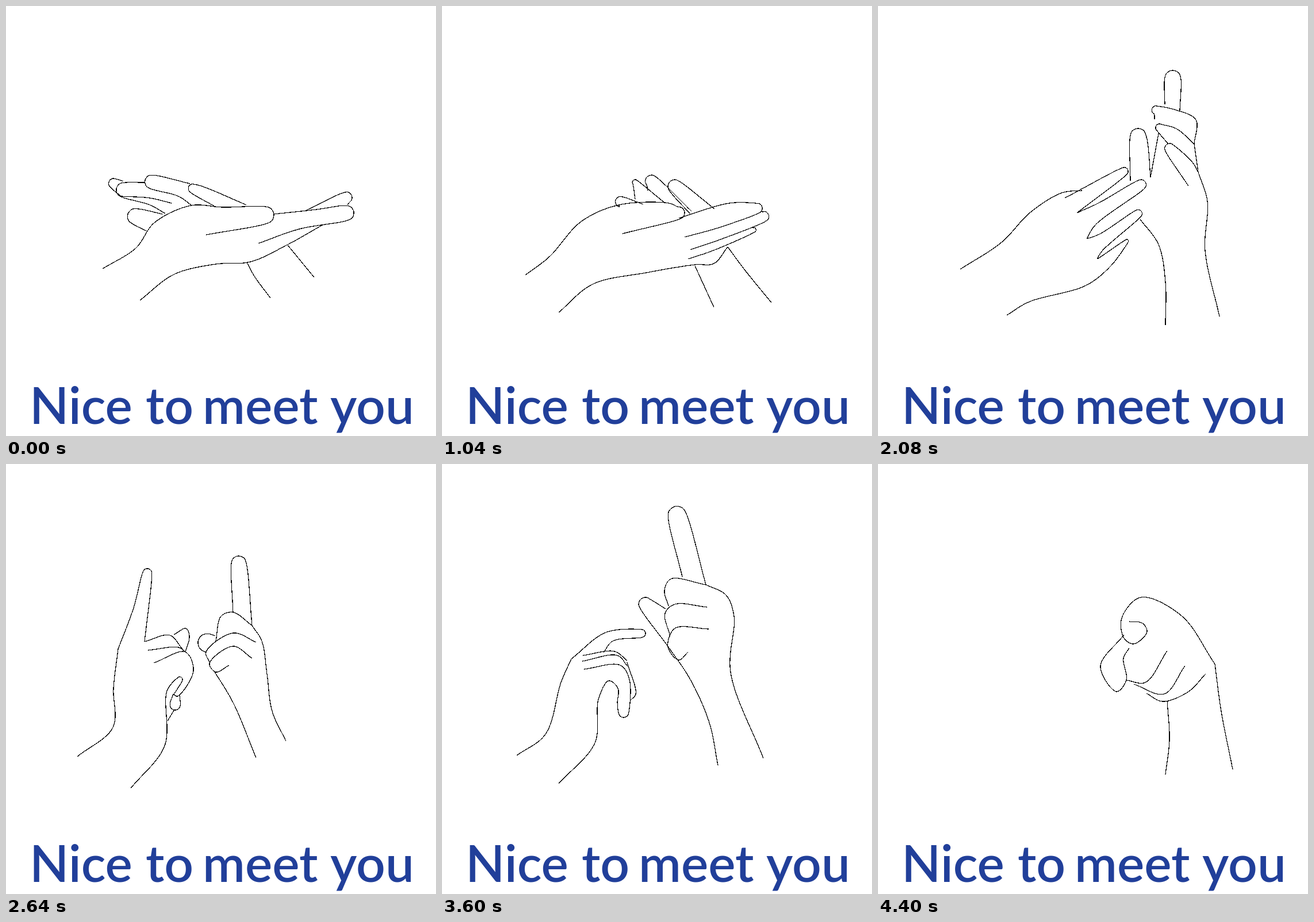
An HTML page that plays this animation: 748 px wide and 748 px high, repeating every 4.48 s.

```html
<!DOCTYPE html>
<html lang="en">
<head>
<meta charset="utf-8">
<title>Nice to meet you</title>
<style>
  html, body { margin: 0; width: 100%; height: 100%; overflow: hidden; background: #fff; }
  svg { display: block; width: 748px; height: 748px; }
  path { fill: none; stroke: #000; stroke-width: 1.25; shape-rendering: crispEdges; }
  text { font: 600 89px Lato, "Open Sans", sans-serif; fill: #213f9a; }
</style>
</head>
<body>
<svg viewBox="0 0 748 748">
  <path id="ink"/>
  <text y="727"><tspan x="41">Nice </tspan><tspan x="243">to </tspan><tspan x="342">meet </tspan><tspan x="564">you</tspan></text>
</svg>
<script>
const LOOP = 4480, STEP = 80, SAMPLES = 80, LEFT_GONE = 4160;

// Key points of each stroke, arm edges first. "x,y,r" is a round fingertip of radius r.
const poses = [
  { left: ["168,457 226,421 258,377 322,347 376,350 466,362,15 348,398",
           "233,512 292,467 365,449 425,445 490,415 552,380",
           "466,362 540,354 605,358,13 510,388 439,413",
           "523,355 601,329,10 594,346"],
    right: ["536,472 490,416",
            "460,508 432,470 419,446",
            "246,392 212,362,14 272,362",
            "277,361 250,346 192,318,13 242,307",
            "320,309 242,303,12 300,331 323,347",
            "418,346 345,315 318,314,8 362,348",
            "200,331 180,304,9 204,305",
            "200,331 250,334 288,343"] },
  { left: ["145,468 187,436 242,375 308,346 395,343 422,358,11 314,396",
           "203,533 262,484 355,464 440,450 473,448 497,419",
           "412,369 500,343 557,350,9 480,386 422,402",
           "555,356 568,363,9 490,404 432,424",
           "540,384 546,388,4 470,426 428,440"],
    right: ["573,516 525,457 497,419",
            "473,524 440,452",
            "350,345 302,338,9 308,347",
            "336,336 333,303,5 388,343",
            "358,321 357,297,11 434,357",
            "474,353 396,306,12 432,362"] },
  { left: ["176,432 235,362 300,337 387,322,13 302,375",
           "222,514 312,461 420,439 481,423,10 420,416",
           "384,340 440,327 520,337,13 430,377 374,390",
           "510,349 552,362,11 465,386 387,416",
           "526,377 470,399 389,430"],
    right: ["595,548 575,450 581,407 598,371",
            "498,555 490,490 479,426",
            "410,333 421,286,14 442,327",
            "443,327 457,228,15 475,255",
            "486,315 472,275 476,254 505,266 520,290",
            "522,326 531,244,18 555,290 561,344",
            "561,344 574,291,13 598,345 598,371"] },
  { left: ["143,458 215,411 265,359 320,325 355,321",
           "224,538 262,515 362,486 405,452 435,407,3 382,440",
           "325,334 434,284,7 346,360",
           "346,360 385,342 465,306,9 378,381 363,405",
           "363,405 385,397 458,357,7 390,426 381,440"],
    right: ["594,540 569,425 573,340 557,289",
            "500,555 500,480 488,415 456,371",
            "439,304 452,213,14 470,245 474,298",
            "499,171 513,112,14 525,182",
            "481,197 477,178,8 515,180 553,198 550,240",
            "550,240 520,214 484,208,7 505,240",
            "540,313 502,241,9 547,272 557,289",
            "474,298 488,222",
            "550,240 557,289"] },
  { left: ["124,509 186,458 187,390 195,322",
           "217,564 276,490 280,395 305,371,5 291,402",
           "195,322 222,250 247,182,8 241,309",
           "241,309 285,298 307,322",
           "247,324 300,319 312,327",
           "257,346 312,327 326,360 298,404 291,400",
           "291,400 293,428,9 302,403",
           "292,297 313,286 319,300 312,327",
           "293,427 281,447"],
    right: ["487,482 463,430 454,365 445,308 428,281",
            "435,511 395,415 362,360",
            "364,299 334,309,16 349,325",
            "395,258 404,160,13 428,281",
            "365,308 374,265 395,258 428,281",
            "435,310 395,294 348,327 354,345",
            "428,338 395,317 354,347 365,362 388,350"] },
  { left: ["130,507 180,470 207,380 225,339",
           "203,556 266,485 272,410 290,377 306,390 305,415",
           "225,339 285,293 354,294,7 297,308 281,328",
           "245,333 300,326 322,342",
           "244,343 305,333 323,352",
           "247,357 310,350 326,375 316,441,9 305,415",
           "322,345 337,400 328,411"],
    right: ["559,512 502,362 508,265 494,228 459,210",
            "480,524 465,450 432,375 393,317",
            "389,252 346,235,12 393,317",
            "418,196 405,74,16 459,210",
            "394,247 387,220 398,200 459,210",
            "461,249 405,244 388,260 397,300",
            "464,287 405,286 393,318 412,341 428,327"] },
  { right: ["617,531 597,430 586,348",
            "500,540 507,480 503,412",
            "428,297 387,352 415,396 432,376 427,338 437,320",
            "437,274 460,277 468,292 445,313 428,303 424,268 457,232 528,264 586,348",
            "503,325 465,380 432,376",
            "534,351 498,400 445,383",
            "570,365 540,396 495,413 467,399"] }
];
poses[6].left = poses[5].left;

// Each move leads to the next pose; the hands swing out by [dx, dy] on the way.
const moves = [
  { from: 0, to: 1040, left: [-33, 10], right: [10, 15] },
  { from: 1040, to: 1520, left: [-20, 0], right: [0, 0] },
  { from: 1600, to: 2080, left: [-40, 8], right: [0, 0] },
  { from: 2240, to: 2640, left: [0, 0], right: [-8, 0] },
  { from: 3200, to: 3600, left: [0, 0], right: [0, 0] },
  { from: 3600, to: 3920, left: [-10, 3], right: [0, 0] }
];

const mix = (a, b, k) => a + (b - a) * k;

// Replaces a fingertip with five points on a half circle, starting on the side of a.
function roundTip([x, y, r], a, b) {
  const mx = (a[0] + b[0]) / 2, my = (a[1] + b[1]) / 2;
  const len = Math.hypot(x - mx, y - my), ux = (x - mx) / len, uy = (y - my) / len;
  const side = (a[1] - my) * ux - (a[0] - mx) * uy > 0 ? 1 : -1;
  return [2, 1, 0, -1, -2].map(n => {
    const angle = n * side * Math.PI / 4, along = r * (Math.cos(angle) - 1), across = r * Math.sin(angle);
    return [x + ux * along - uy * across, y + uy * along + ux * across];
  });
}

// Even samples along a centripetal Catmull-Rom curve.
function sample(text) {
  const keys = text.split(" ").map(p => p.split(",").map(Number));
  const pts = keys.flatMap((p, i) => p[2] ? roundTip(p, keys[i - 1], keys[i + 1]) : [p]);
  const last = pts.length - 1, knots = [0];
  for (let i = 0; i < last; i++)
    knots.push(knots[i] + Math.sqrt(Math.hypot(pts[i + 1][0] - pts[i][0], pts[i + 1][1] - pts[i][1])));
  const slope = (i, j, k) => (pts[j][k] - pts[i][k]) / (knots[j] - knots[i]);
  const tangent = (i, k) => i === 0 ? slope(0, 1, k) : i === last ? slope(last - 1, last, k)
    : slope(i - 1, i, k) - slope(i - 1, i + 1, k) + slope(i, i + 1, k);
  let i = 0;
  return Array.from({ length: SAMPLES + 1 }, (_, n) => {
    const pos = n / SAMPLES * knots[last];
    while (i < last - 1 && pos > knots[i + 1]) i++;
    const h = knots[i + 1] - knots[i], u = (pos - knots[i]) / h, v = 1 - u;
    return [0, 1].map(k =>
      v * v * ((1 + 2 * u) * pts[i][k] + u * h * tangent(i, k)) +
      u * u * ((3 - 2 * u) * pts[i + 1][k] - v * h * tangent(i + 1, k)));
  });
}

const shapes = {};
for (const side of ["left", "right"]) shapes[side] = poses.map(pose => pose[side].map(sample));

function drawHand(side, t) {
  const n = Math.max(0, moves.findLastIndex(move => t >= move.from)), move = moves[n];
  const u = Math.min(1, (t - move.from) / (move.to - move.from)), k = u * u * (3 - 2 * u);
  const [dx, dy] = move[side].map(v => v * Math.sin(Math.PI * u));
  const from = shapes[side][n], to = shapes[side][n + 1];
  let d = "";
  for (let i = 0; i < Math.max(from.length, to.length); i++) {
    // A stroke without a partner is shown only in its own half.
    if (!(k < 0.5 ? from : to)[i]) continue;
    const p = from[i] || to[i], q = to[i] || from[i];
    d += "M" + p.map(([x, y], j) =>
      (mix(x, q[j][0], k) + dx).toFixed(1) + " " + (mix(y, q[j][1], k) + dy).toFixed(1)).join("L");
  }
  return d;
}

const ink = document.getElementById("ink");
const start = performance.now();
let shown = -1;

function tick(now) {
  const t = Math.floor(Math.max(0, now - start) % LOOP / STEP) * STEP;
  if (t !== shown) {
    shown = t;
    ink.setAttribute("d", (t < LEFT_GONE ? drawHand("left", t) : "") + drawHand("right", t));
  }
  requestAnimationFrame(tick);
}
tick(start);
</script>
</body>
</html>
```
